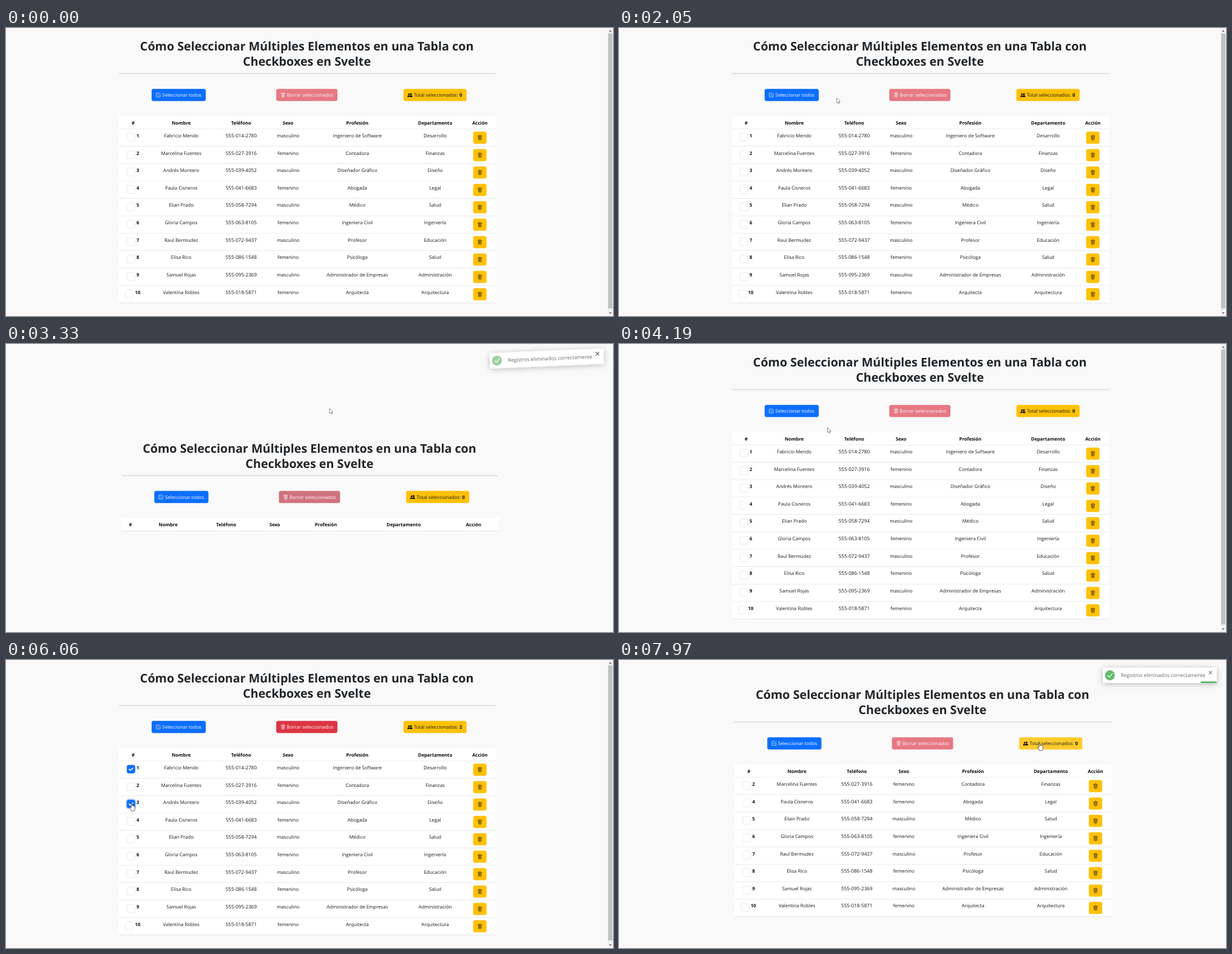
These frames come from a looping animation (1000 px wide and 474 px high, 8 s). An HTML page:

```html
<!DOCTYPE html>
<html lang="es">
<head>
<meta charset="utf-8">
<title>Tabla con checkboxes</title>
<style>
html, body { margin: 0; width: 100%; height: 100%; overflow: hidden; background: #f9f9f9; }
svg { display: block; width: 100vw; height: 100vh; }
text { font: 7.82px "Open Sans", "Noto Sans", sans-serif; fill: #17191c; text-rendering: geometricPrecision; }
.mid { text-anchor: middle; }
.b { font-weight: 700; font-size: 7.7px; fill: #0b0c0d; }
.h1 { font-weight: 700; font-size: 19.72px; fill: #212529; }
.tel { font-size: 8.1px; }
.w { fill: #fff; }
.msg { font-size: 8.3px; fill: #666; }
.line { fill: none; stroke-linecap: round; stroke-linejoin: round; }
</style>
</head>
<body>
<svg id="stage" viewBox="0 0 1000 474" xmlns="http://www.w3.org/2000/svg">
  <defs>
    <filter id="soft" x="-20%" y="-80%" width="140%" height="280%">
      <feDropShadow dx="0" dy="1.5" stdDeviation="5" flood-color="#000" flood-opacity=".27"/>
    </filter>
    <g id="trash" class="line" stroke-width="1.05">
      <path d="M1.8 3.2H14.2M3 3.2L3.9 14.1Q4 15.4 5.3 15.4H10.7Q12 15.4 12.1 14.1L13 3.2M5.4 3V1.6Q5.4.7 6.3.7H9.7Q10.6.7 10.6 1.6V3M5.6 5.6L6 13M8 5.6V13M10.4 5.6L10 13"/>
    </g>
    <g id="square" class="line" stroke-width="1.3">
      <path d="M10.5 1.6H3Q1.6 1.6 1.6 3V13Q1.6 14.4 3 14.4H13Q14.4 14.4 14.4 13V8M5 7L8 10L14.8 3"/>
    </g>
    <g id="people">
      <circle cx="11" cy="5" r="3"/><circle cx="4.6" cy="5.6" r="2.5"/>
      <path d="M6.4 14Q6 9 11 9T16 13Q16 14 15 14ZM5.4 14H1Q0 14 0 13Q.4 9 4.6 9Q6 9 6.7 9.4Q5 11 5.4 14Z"/>
    </g>
  </defs>
</svg>
<script>
const LOOP = 8000, ROW_H = 28.65, TOP = 166.1;
const NS = "http://www.w3.org/2000/svg";
const stage = document.getElementById("stage");

function add(parent, tag, attrs = {}, text) {
  const el = document.createElementNS(NS, tag);
  for (const k in attrs) el.setAttribute(k, attrs[k]);
  if (text !== undefined) el.textContent = text;
  parent.appendChild(el);
  return el;
}
const label = (p, x, y, s, cls = "") => add(p, "text", { x, y, class: cls }, s);
const rect = (p, x, y, width, height, fill, rx = 0) => add(p, "rect", { x, y, width, height, fill, rx });
const rule = (p, y, stroke, w = .8) => add(p, "path", { d: `M186 ${y}H807.3`, stroke, "stroke-width": w });
const icon = (p, id, x, y, color, s = .52) =>
  add(p, "use", { href: "#" + id, transform: `translate(${x} ${y}) scale(${s})`,
    [id === "people" ? "fill" : "stroke"]: color });
const show = (el, on) => el.setAttribute("display", on ? "inline" : "none");
const move = (el, x, y, extra = "") => el.setAttribute("transform", `translate(${x} ${y}) ${extra}`);

// Page content
const page = add(stage, "g");
label(page, 495.6, 37.2, "Cómo Seleccionar Múltiples Elementos en una Tabla con", "h1 mid");
label(page, 495.6, 62.2, "Checkboxes en Svelte", "h1 mid");
rule(page, 75.1, "#c6c8c9", .9);

const buttons = [
  { x: 239.9, w: 89.2, color: "#0d6efd", hover: "#0b5ed7" },
  { x: 445.2, w: 100.8, color: "#dc3545", hover: "#bb2d3b" },
  { x: 654.8, w: 104, color: "#ffc107", hover: "#ffca2c" }
];
for (const b of buttons) {
  b.g = add(page, "g");
  b.box = rect(b.g, b.x, 100.2, b.w, 20, b.color, 3.1);
}
icon(buttons[0].g, "square", 246.8, 106.1, "#fff");
label(buttons[0].g, 257.6, 113.1, "Seleccionar todos", "w");
icon(buttons[1].g, "trash", 452.3, 105.9, "#fff");
label(buttons[1].g, 462.6, 113.1, "Borrar seleccionados", "w");
icon(buttons[2].g, "people", 661.3, 106.1, "#000");
label(buttons[2].g, 672, 113.1, "Total seleccionados:");
const total = label(buttons[2].g, 747, 113.1, "0", "b");

// Table
const heads = ["#", "Nombre", "Teléfono", "Sexo", "Profesión", "Departamento", "Acción"];
const wide = [209.5, 288.7, 387.4, 464.8, 578.8, 707, 780.6];
const narrow = [200.6, 262.7, 358.4, 438.4, 522.6, 650.8, 766];
const people = [
  ["Fabricio Mendo", "555-014-2780", "masculino", "Ingeniero de Software", "Desarrollo"],
  ["Marcelina Fuentes", "555-027-3916", "femenino", "Contadora", "Finanzas"],
  ["Andrés Montero", "555-039-4052", "masculino", "Diseñador Gráfico", "Diseño"],
  ["Paula Cisneros", "555-041-6683", "femenino", "Abogada", "Legal"],
  ["Elian Prado", "555-058-7294", "masculino", "Médico", "Salud"],
  ["Gloria Campos", "555-063-8105", "femenino", "Ingeniera Civil", "Ingeniería"],
  ["Raul Bermudez", "555-072-9437", "masculino", "Profesor", "Educación"],
  ["Elisa Rico", "555-086-1548", "femenino", "Psicóloga", "Salud"],
  ["Samuel Rojas", "555-095-2369", "masculino", "Administrador de Empresas", "Administración"],
  ["Valentina Robles", "555-018-5871", "femenino", "Arquitecta", "Arquitectura"]
];
rect(page, 186, 145, 621.4, 21.1, "#fff", 1.5);
rule(page, TOP, "#dce1e5");
const headEls = heads.map((h, i) => label(page, wide[i], 158.6, h, "b mid"));

// Each row is drawn with its top edge at y = 0
const rows = people.map((person, i) => {
  const g = add(page, "g"), shift = i === 9 ? -2.5 : 0;
  rect(g, 186, .4, 621.4, ROW_H - .4, "#fff");
  rule(g, ROW_H, "#dee2e6");
  const ring = rect(g, 197.2 + shift, 4.9, 17.4, 17.4, "#c2dbfe", 5);
  const box = rect(g, 199.3 + shift, 7, 13.2, 13.2, "#fff", 3);
  const tick = add(g, "path", { d: `M${203 + shift} 13.7l2 2l4-4`, class: "line", stroke: "#fff", "stroke-width": 1.6 });
  label(g, 215 + shift, 13.8, i + 1, "b");
  person.forEach((s, k) => label(g, wide[k + 1], 13.8, s, k === 1 ? "tel mid" : "mid"));
  rect(g, 769.6, 4.4, 22, 20, "#ffc107", 3.1);
  icon(g, "trash", 776.5, 10.2, "#111");
  return { g, ring, box, tick };
});

// Scrollbar
const bar = add(stage, "g");
rect(bar, 991, 0, 9, 474, "#f1f1f1");
rect(bar, 992, 9, 7, 452.5, "#c1c1c1");
add(bar, "path", { d: "M993.4 6.2h4.2l-2.1-2.6z", fill: "#606060" });
add(bar, "path", { d: "M993.4 468h4.2l-2.1 2.6z", fill: "#606060" });

// Toast, centred on its own origin
const toast = add(stage, "g");
rect(toast, -94, -12.4, 187.6, 25, "#fff", 2).setAttribute("filter", "url(#soft)");
const badge = add(toast, "g");
add(badge, "circle", { cx: -82.3, cy: 0, r: 8.2, fill: "#4cae55" });
add(badge, "path", { d: "M-86 .2l2.7 2.7l5-5.4", class: "line", stroke: "#fff", "stroke-width": 1.2 });
label(toast, -64.2, 3, "Registros eliminados correctamente", "msg");
add(toast, "path", { d: "M81 -7l5 5m0 -5l-5 5", class: "line", stroke: "#444", "stroke-width": 1 });
const progress = rect(toast, 0, 10.2, 0, 2.4, "#4caf50");

// Pointers, tip at the origin
const arrow = add(stage, "path", { d: "M0 0V8.3L2 6.6L3.3 9.5L4.7 8.9L3.4 6H6Z",
  fill: "#fff", stroke: "#666", "stroke-width": .7, "stroke-linejoin": "round" });
const hand = add(stage, "g", { stroke: "#333", "stroke-width": .7, fill: "#fff", "stroke-linejoin": "round" });
add(hand, "path", { d: "M-.9 .7Q0-.5 .9 .7V4.2Q2-.0 2.6 4.6Q3.8 3.8 4.2 5Q5.6 4.6 5.6 6V9Q5.2 10 4.7 11V12.4H-.6V11L-3.4 7.2Q-3.2 5.6-.9 7.2Z" });

// Pointer route: time, x, y
const route = [
  [1180, 716, 113], [1510, 716, 113], [1850, 440, 119], [2050, 358.6, 115.2], [2220, 300, 110],
  [2400, 300, 110], [2900, 533, 106], [3400, 533, 106], [3950, 360, 130], [4100, 350, 135],
  [4760, 225, 183], [4910, 225, 183], [5000, 217, 183.5], [5150, 217, 183.5], [5210, 212.4, 183],
  [5430, 212.4, 183], [5770, 207, 236], [6080, 207, 236], [6410, 330, 200], [6560, 330, 200],
  [6700, 420, 150], [6860, 420, 150], [6970, 504, 128], [7000, 504, 114.2], [7480, 504, 114.2],
  [7760, 693, 136.6], [8000, 693, 136.6]
];
function pointer(t) {
  const i = route.findIndex(p => p[0] > t);
  if (i < 1) return i === 0 ? [-99, -99] : route[route.length - 1].slice(1);
  const [t0, x0, y0] = route[i - 1], [t1, x1, y1] = route[i];
  let u = (t - t0) / (t1 - t0);
  u = u * u * (3 - 2 * u);
  return [x0 + (x1 - x0) * u, y0 + (y1 - y0) * u];
}

// Table state at a time
function state(t) {
  const all = people.map((_, i) => i);
  let list = all, checked = [], focus = -1, since = -1;
  if (t >= 2300 && t < 3150) checked = all;
  else if (t >= 3150 && t < 3950) { list = []; since = t - 3150; }
  else if (t >= 7400) { list = all.filter(i => i !== 0 && i !== 2); since = t - 7400; }
  else if (t >= 5970) { checked = [0, 2]; focus = 2; }
  else if (t >= 5260) { checked = [0]; focus = 0; }
  const gone = 10 - list.length;
  return { list, checked, focus, since, dx: gone ? 4.4 : 0, dy: gone ? gone * ROW_H / 2 - 1.6 : 0 };
}

// Button index under the pointer, 3 for a checkbox, -1 for nothing
function hit(t) {
  const s = state(t), [px, py] = pointer(t), x = px - s.dx, y = py - s.dy;
  if (y > 100 && y < 120.5) {
    const i = buttons.findIndex(b => x > b.x && x < b.x + b.w);
    return i === 1 && !s.checked.length ? -1 : i;
  }
  const ry = (y - TOP) % ROW_H;
  return y > TOP && y < TOP + s.list.length * ROW_H && x > 199 && x < 213 && ry > 6 && ry < 21 ? 3 : -1;
}

const swing = [[0, 2, -5], [.36, -2.4, -1.3], [.7, 2, 2], [1, 0, 0]];
function drawToast(ms) {
  show(toast, ms >= 0);
  if (ms < 0) return;
  const u = Math.min(ms / 500, 1);
  const i = Math.max(1, swing.findIndex(k => k[0] >= u));
  const a = swing[i - 1], b = swing[i], f = (u - a[0]) / (b[0] - a[0]);
  const mix = k => a[k] + (b[k] - a[k]) * f;
  move(toast, 891, 25.2 + mix(2), `rotate(${mix(1)})`);
  badge.setAttribute("opacity", Math.min(.85, .36 + ms / 1000));
  const w = Math.max(0, ms - 180) / 2800 * 187;
  progress.setAttribute("x", 93.6 - w);
  progress.setAttribute("width", w);
}

function draw(t) {
  const s = state(t), count = s.checked.length;
  move(page, s.dx, s.dy);
  show(bar, s.list.length === 10);
  headEls.forEach((h, i) => h.setAttribute("x", (s.list.length ? wide : narrow)[i]));
  rows.forEach((r, i) => {
    const pos = s.list.indexOf(i), on = s.checked.includes(i);
    show(r.g, pos >= 0);
    move(r.g, 0, TOP + pos * ROW_H);
    show(r.ring, s.focus === i);
    show(r.tick, on);
    r.box.setAttribute("fill", on ? "#0d6efd" : "#fff");
    r.box.setAttribute("stroke", on ? "#0d6efd" : "#dfe2e6");
    r.box.setAttribute("stroke-width", .7);
  });
  const over = hit(t - 190);
  buttons.forEach((b, i) => b.box.setAttribute("fill", over === i ? b.hover : b.color));
  buttons[1].g.setAttribute("opacity", count ? 1 : .65);
  buttons[2].box.setAttribute("width", count > 9 ? 108.4 : 104);
  total.textContent = count;
  drawToast(s.since);

  const [x, y] = pointer(t), seen = t >= 1510, press = hit(t) >= 0;
  show(arrow, seen && !press);
  show(hand, seen && press);
  move(arrow, x, y);
  move(hand, x, y);
}

const start = performance.now();
function tick() {
  draw((performance.now() - start) % LOOP);
  requestAnimationFrame(tick);
}
tick();
</script>
</body>
</html>
```
